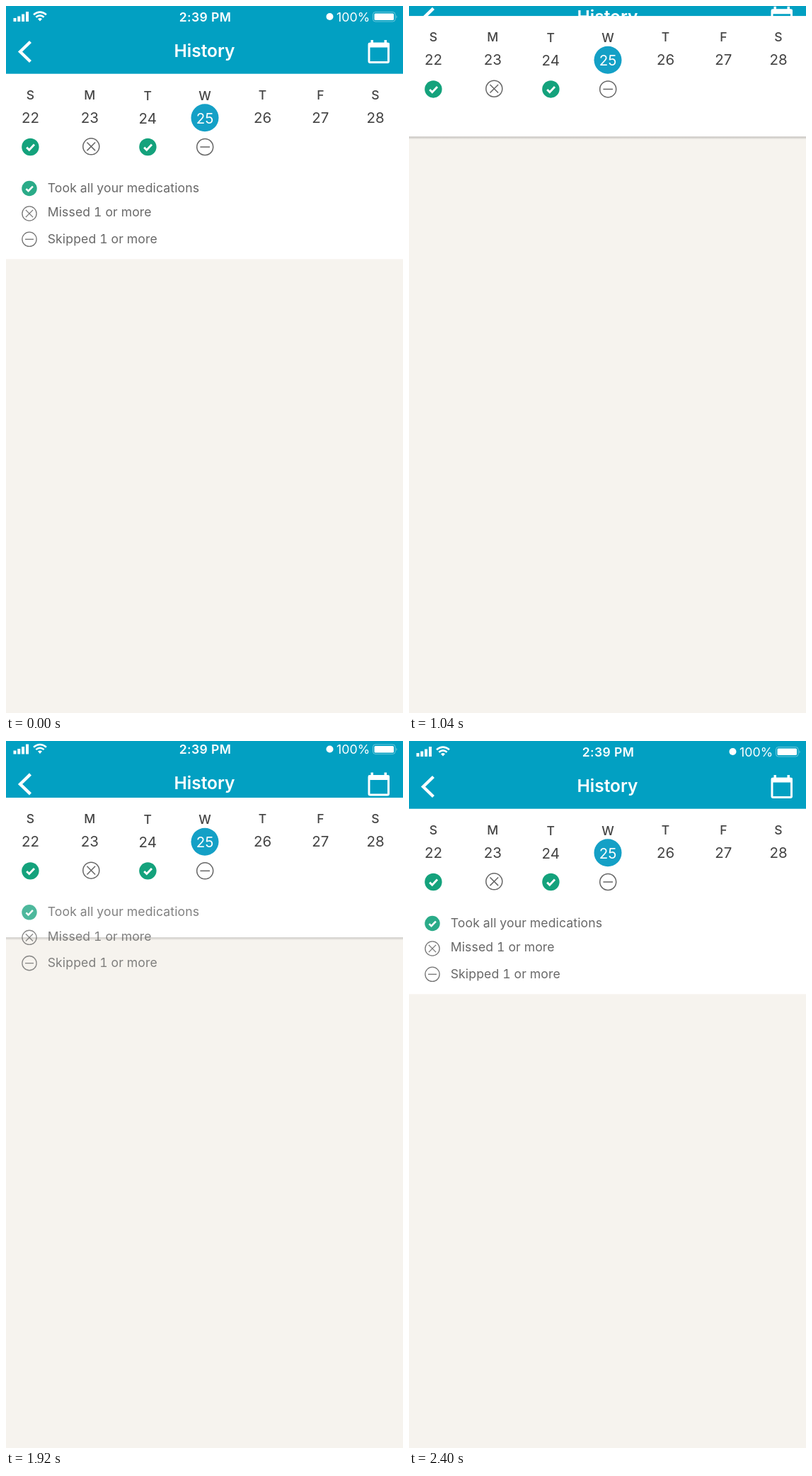
An HTML page that plays this animation: 561 by 998 pixels, repeating every 3220 ms.

```html
<!DOCTYPE html>
<html lang="en">
<head>
<meta charset="utf-8">
<style>
html, body { margin: 0; width: 100%; height: 100%; overflow: hidden; background: #f6f3ee; }
svg { display: block; width: 561px; height: 998px; font-family: Inter, Roboto, sans-serif; }
.line { fill: none; stroke: #666; stroke-width: 1.5; }
.white { fill: #fff; }
.stroke { fill: none; stroke: #fff; }
#legend { font-size: 17.6px; letter-spacing: .12px; font-variant-numeric: tabular-nums; }
</style>
</head>
<body>
<svg viewBox="0 0 561 998">
  <defs>
    <linearGradient id="shade" x2="0" y2="1">
      <stop stop-color="#000" stop-opacity=".22"/>
      <stop offset="1" stop-color="#000" stop-opacity="0"/>
    </linearGradient>
    <g id="check">
      <circle r="12.2" fill="#14a27c"/>
      <path class="stroke" d="M-5.2 .6L-1.6 4.2L5.6 -3.4" stroke-width="2.9"/>
    </g>
    <g id="missed" class="line">
      <circle r="11.5"/>
      <path d="M-5.8 -5.8L5.8 5.8M5.8 -5.8L-5.8 5.8"/>
    </g>
    <g id="skipped" class="line">
      <circle r="11.5"/>
      <path d="M-6.8 0H6.8"/>
    </g>
  </defs>
  <g id="page">
    <rect width="561" height="96" fill="#02a0c2"/>
    <g id="bar" class="white">
      <path d="M10.5 17h4v5h-4zM16.3 14.5h4v7.5h-4zM22.1 11.5h4v10.5h-4zM28 8h4v14h-4z"/>
      <path d="M48 21.5L45 18.2Q48 15.8 51 18.2z"/>
      <path class="stroke" d="M42.3 15.7Q48 11 53.7 15.7M39 12.3Q48 5 57 12.3" stroke-width="2.5"/>
      <text x="281.5" y="21.5" font-size="17.5" font-weight="600" letter-spacing=".4" text-anchor="middle">2:39 PM</text>
      <circle cx="457.5" cy="15" r="5"/>
      <text x="467" y="21.5" font-size="17.8">100%</text>
      <rect class="stroke" x="518.5" y="8.5" width="31.5" height="13.5" rx="3.5" opacity=".4"/>
      <rect x="520.5" y="10.5" width="27.5" height="9.5" rx="1.5"/>
      <path d="M551.5 13q2 2.3 0 4.600z" opacity=".5"/>
      <path class="stroke" d="M34.500 50.500L20 64.500L34.500 78.500" stroke-width="4.300"/>
      <text x="280.5" y="71.500" font-size="24.500" font-weight="600" text-anchor="middle">History</text>
      <rect class="stroke" x="513" y="53" width="27.500" height="26.500" rx="1.500" stroke-width="3"/>
      <path d="M512 52h29.500v6.500H512zM515.500 48h3.500v5h-3.500zM534.500 48h3.500v5h-3.500z"/>
    </g>
    <rect id="card" class="white" y="95.700" width="561"/>
    <rect id="shadow" width="561" height="4" fill="url(#shade)"/>
    <circle cx="281" cy="157.800" r="19.500" fill="#14a0c6"/>
    <g id="week" text-anchor="middle" fill="#444"></g>
    <g id="legend" fill="#585858"></g>
  </g>
</svg>
<script>
const $ = id => document.getElementById(id);
const clamp = v => Math.max(0, Math.min(1, v));
const smooth = v => { v = clamp(v); return v * v * (3 - 2 * v); };
const shift = (id, y) => $(id).setAttribute('transform', `translate(0 ${y})`);

const icon = (name, x, y, scale = 1) =>
  `<use href="#${name}" transform="translate(${x} ${y}) scale(${scale})"/>`;
const label = (text, x, y, attrs = '') => `<text x="${x}" y="${y}" ${attrs}>${text}</text>`;

const columns = [34.5, 118.3, 200.3, 281, 362.5, 444.3, 522];
$('week').innerHTML = columns.map((x, i) => {
  const drop = i === 2 || i === 3 ? 1.2 : 0;
  return label('SMTWTFS'[i], x, 131.8 + drop, 'font-size="17.5" font-weight="500"') +
    label(22 + i, x, 164.5 + drop, `font-size="20.5" ${i === 3 ? 'fill="#fff"' : ''}`);
}).join('') +
  icon('check', 34.4, 199) + icon('missed', 120.3, 198.3) +
  icon('check', 200.4, 199) + icon('skipped', 281.2, 199);

$('legend').innerHTML = [
  ['check', 257.5, 'Took all your medications', 263],
  ['missed', 293, 'Missed 1 or more', 297.4],
  ['skipped', 329.3, 'Skipped 1 or more', 334.7]
].map(([name, y, text, base]) => icon(name, 33, y, .88) + label(text, 58.7, base)).join('');

const spring = s => 1 - Math.exp(-10 * s) * (Math.cos(10 * s) + Math.sin(10 * s));

// scroll, fold and lag run from 0 (open) to 1 (collapsed);
// lag holds the bar's content back so that the card slides over it
function pose(t) {
  if (t < 1780) return {
    scroll: 1 - (1 - clamp((t - 740) / 490)) ** 2,
    fold: smooth((t - 740) / 460),
    lag: clamp((t - 740) / 440) ** 2,
    legend: 1 - clamp((t - 740) / 80)
  };
  const open = t < 2400 ? spring((t - 1751.5) / 1000) : 1;
  return {
    scroll: 1 - open,
    fold: 1 - smooth((t - 1742) / 360),
    lag: clamp(1 - open),
    legend: open
  };
}

function draw() {
  const t = Math.floor(performance.now() % 3220 / 20) * 20;
  const { scroll, fold, lag, legend } = pose(t);
  const bottom = 357.3 - 126.7 * fold;
  shift('page', -96 * scroll);
  shift('bar', 74 * lag);
  $('card').setAttribute('height', bottom - 95.7);
  $('shadow').setAttribute('y', bottom);
  $('shadow').setAttribute('opacity', clamp(fold * 1.6));
  $('legend').setAttribute('opacity', .9 * legend);
  requestAnimationFrame(draw);
}
draw();
</script>
</body>
</html>
```
